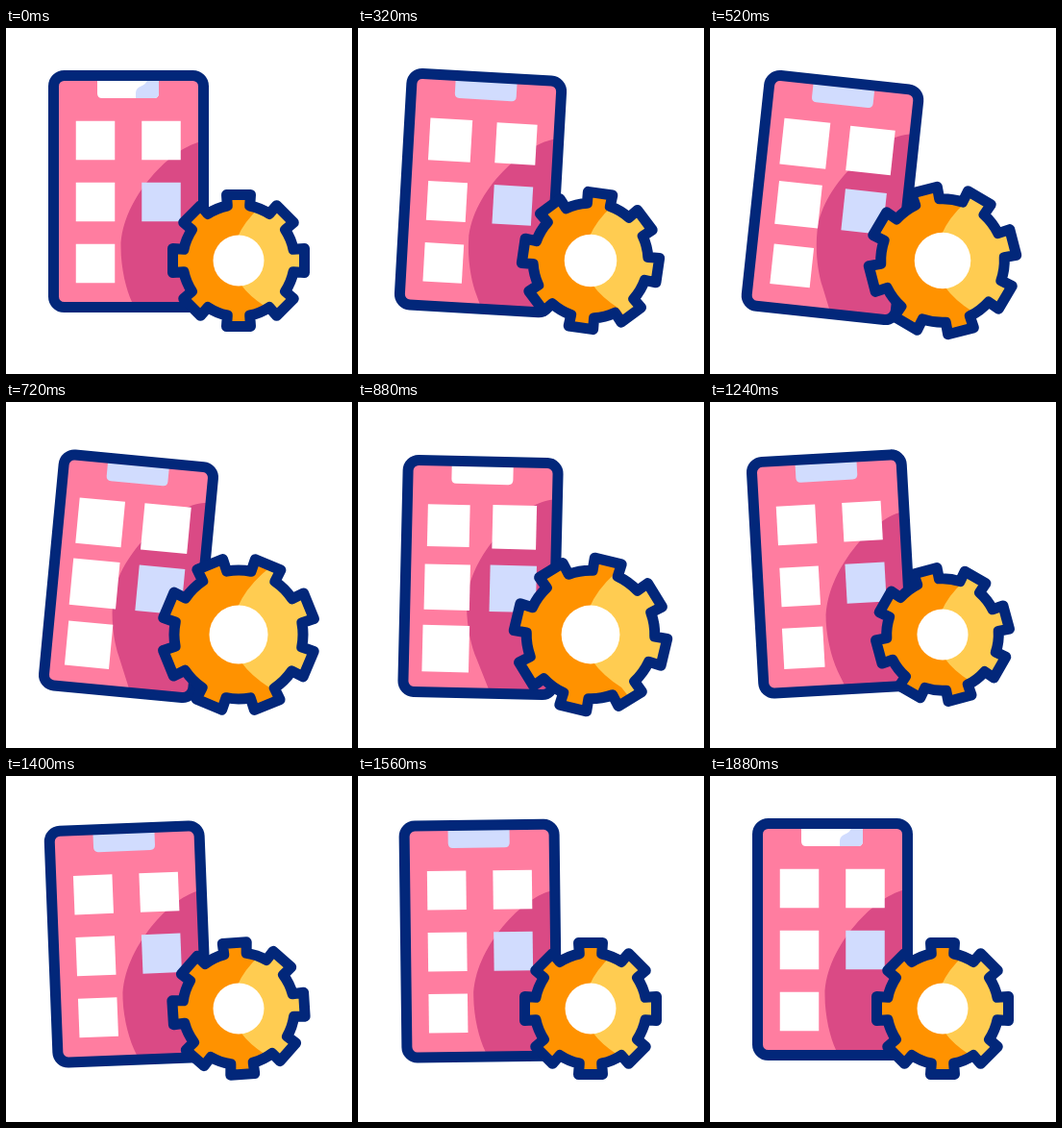
An HTML page for the animation above (1960 ms loop, 360 by 360 pixels).

```html
<!DOCTYPE html>
<html lang="en">
<head>
<meta charset="utf-8">
<title>Phone settings</title>
<style>
  html, body { margin: 0; width: 100%; height: 100%; overflow: hidden; background: #fff; }
  svg { display: block; width: 100vw; height: 100vh; }
  .outline { fill: none; stroke: #02277a; stroke-width: 11; stroke-linejoin: round; }
</style>
</head>
<body>
<svg viewBox="0 0 360 360">
  <defs>
    <clipPath id="screen"><rect x="49.5" y="49.5" width="156" height="241" rx="11"/></clipPath>
    <clipPath id="gearClip"><path class="gearShape"/></clipPath>
  </defs>

  <g id="phone">
    <g clip-path="url(#screen)">
      <rect x="44" y="44" width="167" height="252" fill="#ff7da0"/>
      <path id="shade" fill="#da4a85"
        d="M260 112 L205 118 C174 122 120 177 119.5 228 C119.5 250 125 272 131 285 L145 318 V340 H260 Z"/>
    </g>
    <g id="cells"></g>
    <path id="notch" d="M95 54 H159 V68 Q159 73 154 73 H100 Q95 73 95 68 Z"/>
    <path id="notchShade" fill="#d1dcfe"
      d="M159 54 H147 C145 62 136 59 135 67 V73 H154 Q159 73 159 68 Z"/>
    <rect class="outline" x="49.5" y="49.5" width="156" height="241" rx="11"/>
  </g>

  <g id="gear">
    <g clip-path="url(#gearClip)">
      <rect x="-80" y="-80" width="160" height="160" fill="#ff9200"/>
      <path fill="#ffcc51" d="M30 -62 Q-6 -34 -6 0 Q-6 26 28 48 L50 76 H80 V-76 H30 Z"/>
    </g>
    <path id="gearOutline" class="gearShape outline"/>
    <circle r="26.5" fill="#fff"/>
  </g>
</svg>
<script>
  const LOOP = 1960, STEP = 40, TEETH = 8, STROKE = 11;
  const $ = id => document.getElementById(id);
  const clamp = x => Math.min(1, Math.max(0, x));
  const bell = (t, start, length) => Math.sin(Math.PI * clamp((t - start) / length)) ** 2;

  // Symmetric ease-in-out
  function ease(x) {
    const a = x ** 1.85, b = (1 - x) ** 1.85;
    return a / (a + b);
  }

  // Eased interpolation through [time, value] keys
  function track(t, keys) {
    if (t <= keys[0][0]) return keys[0][1];
    for (let i = 1; i < keys.length; i++) {
      const [t0, a] = keys[i - 1], [t1, b] = keys[i];
      if (t < t1) return a + (b - a) * ease((t - t0) / (t1 - t0));
    }
    return keys[keys.length - 1][1];
  }

  function gearPath() {
    const tooth = [[-11.7, -57], [-12.5, -68.5], [12.5, -68.5], [11.7, -57]];
    let d = "";
    for (let i = 0; i < TEETH; i++) {
      const a = i * 2 * Math.PI / TEETH, c = Math.cos(a), s = Math.sin(a);
      tooth.forEach(([x, y], k) => {
        const command = k ? "L" : i ? "A58 58 0 0 1 " : "M";
        d += `${command}${(x * c - y * s).toFixed(2)} ${(x * s + y * c).toFixed(2)}`;
      });
    }
    return d + "A58 58 0 0 1 -11.7 -57Z";
  }

  const gearShapes = document.querySelectorAll(".gearShape");
  gearShapes.forEach(shape => shape.setAttribute("d", gearPath()));

  const cells = [[93, 117], [161.5, 117], [93, 181], [161.5, 181], [93, 245]].map(([x, y], i) => {
    const el = document.createElementNS("http://www.w3.org/2000/svg", "rect");
    el.setAttribute("fill", i === 3 ? "#d1dcfe" : "#fff");
    $("cells").append(el);
    return { el, x, y, start: 100 + 75 * i };
  });

  function draw(t) {
    const angle = track(t, [[40, 0], [590, 6.3], [1160, -3.3], [1760, 0]]);
    const drop = track(t, [[120, 0], [900, 12.5], [1800, 0]]);
    $("phone").setAttribute("transform", `translate(0 ${drop}) rotate(${angle} 127.5 170)`);

    const lift = bell(t, 80, 1400);
    $("shade").setAttribute("transform", `translate(${-6 * lift} ${-32 * lift})`);

    for (const { el, x, y, start } of cells) {
      const size = 40.5 * (1 + 0.2 * bell(t, start, 1000));
      el.setAttribute("x", x - size / 2);
      el.setAttribute("y", y - size / 2);
      el.setAttribute("width", size);
      el.setAttribute("height", size);
    }

    const resting = t < 80 || t >= 1880;
    const flash = t >= 880 && t < 920;
    $("notch").setAttribute("fill", resting || flash ? "#fff" : "#d1dcfe");
    $("notchShade").setAttribute("visibility", resting ? "visible" : "hidden");

    const spin = track(t, [[80, 0], [1560, 180]]);
    const scale = track(t, [[100, 1], [800, 1.155], [1280, 1]]);
    gearShapes.forEach(shape => shape.setAttribute("transform", `rotate(${spin})`));
    $("gearOutline").style.strokeWidth = STROKE / scale;
    $("gear").setAttribute("transform", `translate(242 242) scale(${scale})`);
  }

  const origin = performance.now();
  function tick() {
    const t = (performance.now() - origin) % LOOP;
    draw(Math.floor(t / STEP) * STEP);
    requestAnimationFrame(tick);
  }
  tick();
</script>
</body>
</html>
```
